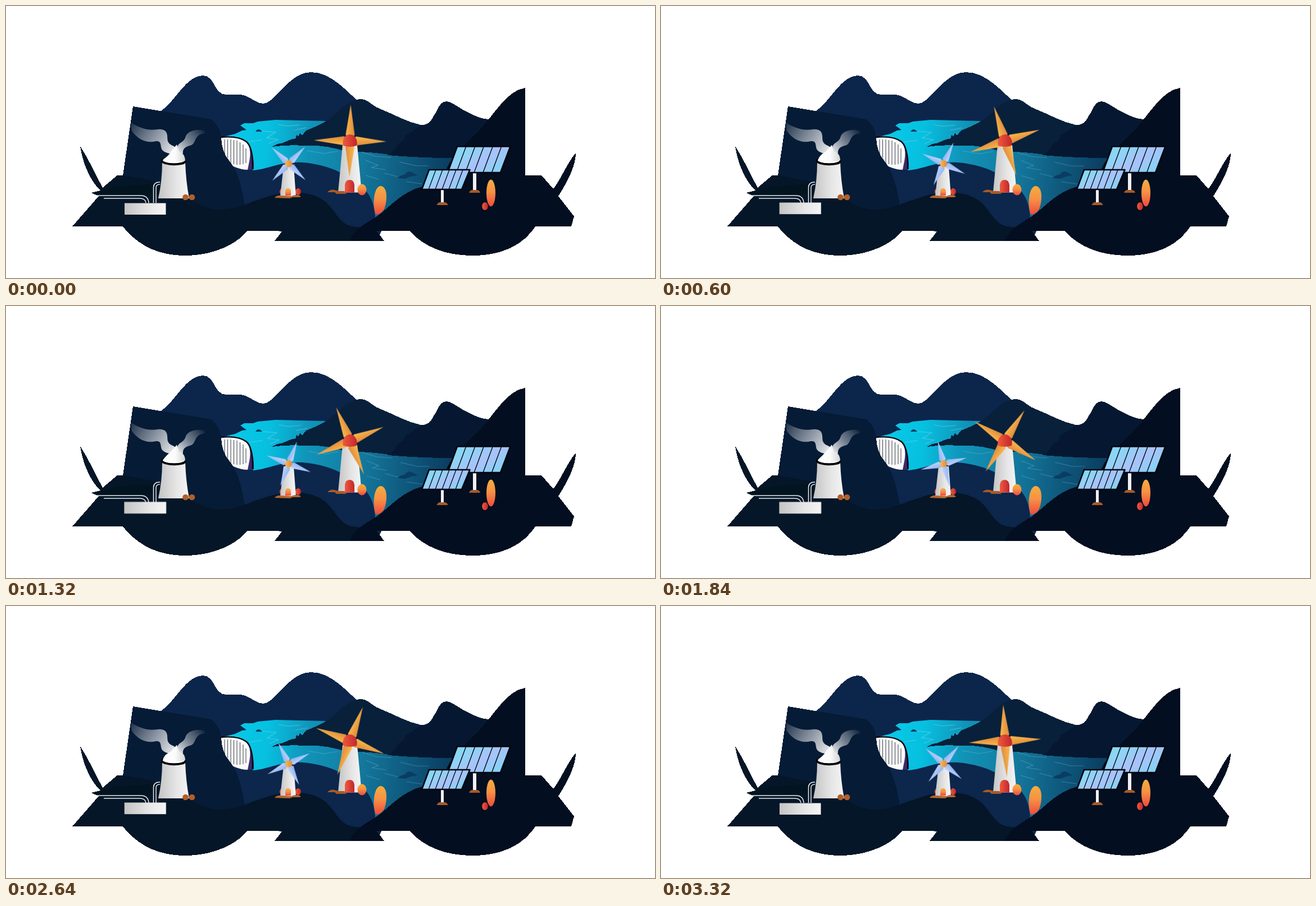
These frames come from a looping animation (1155x485 px, 3.36 s). An HTML page without scripts:

```html
<!DOCTYPE html>
<html lang="en">
<head>
<meta charset="utf-8">
<title>Renewable valley</title>
<style>
  html, body { margin: 0; width: 100%; height: 100%; overflow: hidden; background: #fff; }
  svg { display: block; width: 100vw; height: 100vh; }
  .crisp { shape-rendering: crispEdges; }

  /* Every part eases between two poses, turning at the same moment. */
  .sails { animation: spin 3.36s linear infinite; }
  @keyframes spin {
    0% { transform: rotate(0deg); }
    45.2% { transform: rotate(180deg); }
    100% { transform: rotate(360deg); }
  }
  .tank { transform-origin: 248px 361px; animation: lift 3.36s linear infinite; }
  @keyframes lift {
    0%, 100% { transform: none; }
    45.2% { transform: translateY(-2.4px) scale(1.02); }
  }
  .glints { animation: drift 3.36s linear infinite; }
  @keyframes drift {
    0%, 100% { transform: none; }
    45.2% { transform: translate(2px, 1px); }
  }
</style>
</head>
<body>
<svg viewBox="0 0 1155 485" xmlns="http://www.w3.org/2000/svg">
  <defs>
    <linearGradient id="water" gradientUnits="userSpaceOnUse" x1="400" y1="250" x2="790" y2="300">
      <stop offset="0" stop-color="#08c9e8"/>
      <stop offset=".16" stop-color="#07c0e0"/>
      <stop offset=".35" stop-color="#1193b8"/>
      <stop offset=".6" stop-color="#14789d"/>
      <stop offset="1" stop-color="#0a3c60"/>
    </linearGradient>
    <linearGradient id="stone">
      <stop offset="0" stop-color="#c4c4c4"/>
      <stop offset=".6" stop-color="#e6e6e6"/>
      <stop offset="1" stop-color="#f5f5f5"/>
    </linearGradient>
    <linearGradient id="ember" x2="0" y2="1">
      <stop offset="0" stop-color="#f5ad3f"/>
      <stop offset=".45" stop-color="#f69245"/>
      <stop offset="1" stop-color="#ef4a3c"/>
    </linearGradient>
    <linearGradient id="red">
      <stop offset="0" stop-color="#ef5a3c"/>
      <stop offset="1" stop-color="#c1272d"/>
    </linearGradient>
    <linearGradient id="gold">
      <stop offset="0" stop-color="#fbb84c"/>
      <stop offset="1" stop-color="#dd8a3c"/>
    </linearGradient>
    <linearGradient id="ice">
      <stop offset="0" stop-color="#8db4f0"/>
      <stop offset="1" stop-color="#c3d3fd"/>
    </linearGradient>
    <linearGradient id="glass" x2="1" y2=".6">
      <stop offset="0" stop-color="#7fdcf3"/>
      <stop offset=".35" stop-color="#8fd3f6"/>
      <stop offset=".65" stop-color="#a9c2fb"/>
      <stop offset="1" stop-color="#86d2f5"/>
    </linearGradient>
    <linearGradient id="smokeL" gradientUnits="userSpaceOnUse" x1="222" y1="212" x2="302" y2="262">
      <stop offset="0" stop-color="#fff" stop-opacity=".12"/>
      <stop offset=".5" stop-color="#e4e6ea" stop-opacity=".6"/>
      <stop offset="1" stop-color="#fff" stop-opacity=".95"/>
    </linearGradient>
    <linearGradient id="smokeR" gradientUnits="userSpaceOnUse" x1="354" y1="222" x2="308" y2="262">
      <stop offset="0" stop-color="#fff" stop-opacity=".03"/>
      <stop offset=".5" stop-color="#d5d8de" stop-opacity=".5"/>
      <stop offset="1" stop-color="#fff" stop-opacity=".9"/>
    </linearGradient>
    <linearGradient id="puffFill">
      <stop offset="0" stop-color="#fff"/>
      <stop offset=".55" stop-color="#fbfbfb"/>
      <stop offset="1" stop-color="#d4d4d4"/>
    </linearGradient>
    <path id="bigBlade" d="M0-64.500L8-11 0 0-8-11Z" fill="url(#gold)"/>
    <path id="smallBlade" d="M0-42L5.800-8 0 0-5.800-8Z" fill="url(#ice)"/>
    <path id="mound" d="M-10 5Q-8 0-4 0H5Q9 1 10 5Z" fill="#a65a28"/>
  </defs>

  <g transform="translate(0 1)">
    <!-- far mountains -->
    <path class="crisp" fill="#0c254b" d="M262 192Q275 188 281 182C302 166 322 123 350 123C373 123 369 157 392 157
      C408 157 416 155 428 160C440 165 447 173 458 173C480 172 503 117 543 117C578 117 605 150 626 168
      L700 300V395H380Z"/>

    <!-- river -->
    <path fill="url(#water)" d="M380 234L408 227 420 221 428 220 417 212 424 208 440 208 448 205 480 202 568 204
      L640 240 700 262 800 266V330L740 350 670 378H650L600 320 440 292Z"/>
    <path fill="#0b3c64" d="M444 223Q449 215 456 223ZM697 306Q702 300 709 300Q716 291 724 296L733 301 721 303 711 307Z"/>
    <g class="glints" fill="none" stroke="#8fdcf0" stroke-width="1.1" stroke-opacity=".5">
      <path d="M484 210L501 213 523 211M455 222L480 224 464 234 484 237 468 244M432 241L455 238M514 220L535 216"/>
      <path d="M536 257L566 262 590 258M634 260L658 267 686 269M640 274L662 283 650 287 676 291M673 297L696 303M700 277L730 284 752 284M640 301L664 308M712 312L740 316" stroke-opacity=".32"/>
    </g>

    <!-- middle ranges -->
    <path class="crisp" fill="#08203a" d="M473 250L483 245 493 243 507 237 516 235 517 228 520 232 523 226 527 230 534 221
      Q552 214 565 207C590 194 603 166 632 165C646 166 651 177 665 182C690 192 716 207 738 211L760 264
      L682 264Q640 258 606 259 570 246 530 248 500 246 473 250Z"/>
    <path class="crisp" fill="#061831" d="M679 265Q693 258 696 246L708 238 711 229 724 222 738 211
      C756 212 757 200 765 189C771 174 777 169 784 169C795 170 810 184 825 190C840 198 850 201 862 201
      L870 270H790Q740 270 679 265Z"/>

    <!-- mill hill -->
    <path fill="#0c264c" d="M400 288L440 292C468 290 486 276 528 278C575 282 606 299 630 318
      C651 336 655 353 657 376L684 366 660 418H560L400 380Z"/>

    <!-- dam -->
    <path fill="#3c2c6c" d="M425 242Q442 254 441 290L430 291Z"/>
    <path fill="#fbfbfb" d="M380 233Q420 231 430 245 437 255 433 276L430 291Q408 291 380 270Z"/>
    <path fill="none" stroke="#3b3f4a" stroke-width="1" d="M389 237V262M394.500 237V270M400 237V279M405.500 238V281M411 239V282M416.500 242V282M422 246V281M427 253V279"/>
    <path fill="none" stroke="#02060f" stroke-width="2.400" d="M382 233Q414 230 428 241 440 252 439 290"/>

    <!-- left cliff -->
    <path class="crisp" fill="#051b36" d="M226 178L365 201C377 210 382 222 383 234C384 252 388 264 398 276
      C412 292 421 325 426 362L300 375 206 330 208 301Z"/>

    <!-- left foreground -->
    <path class="crisp" fill="#041627" d="M132 249C147 271 158 298 172 323L198 301H208L270 312 300 340 327 342
      C346 356 361 362 380 362C412 362 428 350 460 341C496 327 545 327 570 349C590 368 594 393 625 393
      L660 400 673 418H478L492 400H430C407 427 365 444 318 444C273 444 235 427 208 392H118L165 338 152 332 168 328
      C151 312 137 282 132 249Z"/>
    <path fill="#031421" d="M152 332L200 321 268 316V334L165 338Z"/>

    <!-- right cliff and foreground -->
    <path class="crisp" fill="#030e20" d="M924 145V301H953L974 325C987 309 999 278 1014 261C1014 282 1002 308 983 338
      L1011 374 1006 392H942C920 427 880 444 830 444C785 444 745 430 718 400H658L673 418H612
      C622 390 650 384 668 368C696 344 716 324 752 319C785 312 778 290 795 271
      C812 246 838 229 856 205C878 177 897 149 924 145Z"/>

    <!-- cooling tower -->
    <path fill="url(#stone)" d="M278 277H319Q320 311 326 342H271Q278 311 278 277Z"/>
    <g fill="#b05f2a"><circle cx="319.500" cy="340" r="5.300"/><circle cx="331" cy="340" r="5.300"/></g>
    <path fill="url(#smokeL)" d="M222 207C236 215 250 222 270 219C291 217 286 233 288 240C291 249 300 246 303 254
      L301 262H291C282 260 277 257 276 251C275 242 274 240 267 240C250 244 236 238 224 222Z"/>
    <path fill="url(#smokeR)" d="M354 221C337 217 323 223 320 231C317 243 308 241 305 250L307 261 315 262
      C314 251 323 249 330 247C339 243 334 228 354 226Z"/>
    <ellipse cx="298" cy="275" rx="21" ry="6" fill="#fff" stroke="#05060a" stroke-width="3"/>
    <path fill="url(#puffFill)">
      <animate attributeName="d" dur="1.68s" repeatCount="indefinite" values="
        M279 273Q290 266 294 258L304 246 308 259Q318 261 319 275Q300 281 279 273Z;
        M279 274Q280 263 293 259L304 247 308 259Q319 261 319 274Q300 280 279 274Z;
        M279 273Q290 266 294 258L304 246 308 259Q318 261 319 275Q300 281 279 273Z"/>
    </path>
    <path fill="none" stroke="#05060a" stroke-width="3.600" d="M277 274C278 283 317 284 319 276"/>

    <!-- pipes and tank -->
    <g fill="none" stroke="#e9ebee" stroke-width="1.500">
      <path d="M162 337H240Q253 337 254 350M174 342H238Q248 342 249 350"/>
      <path d="M262.500 350V322Q263 313 274 313M267 350V323Q267 317 274 317"/>
    </g>
    <rect class="tank" x="211" y="350.500" width="73.500" height="20.500" fill="url(#stone)"/>

    <!-- small mill -->
    <ellipse cx="492" cy="330" rx="5" ry="6" fill="url(#red)"/>
    <ellipse cx="520" cy="330" rx="5" ry="6" fill="url(#red)"/>
    <path fill="url(#stone)" d="M494 285H512L516 338H488Z"/>
    <path fill="url(#ember)" d="M497 337V329Q498 324 502 324 507 324 507 330V337Z"/>
    <path fill="#b4652e" d="M478 341Q482 336 490 337L508 338Q520 333 525 339L522 340 510 340 505 342Z"/>
    <g transform="translate(503 280.300) rotate(44)">
      <g class="sails">
        <use href="#smallBlade"/><use href="#smallBlade" transform="rotate(90)"/>
        <use href="#smallBlade" transform="rotate(180)"/><use href="#smallBlade" transform="rotate(270)"/>
      </g>
    </g>
    <circle cx="503" cy="280.300" r="6.300" fill="url(#gold)"/>

    <!-- big mill -->
    <path fill="url(#stone)" d="M599 247H625L633 331.500H591Z"/>
    <path fill="url(#red)" d="M603 331.500V318Q604 309 611.500 309 619 309 620 318V331.500Z"/>
    <ellipse cx="633.500" cy="326.500" rx="8" ry="10" fill="url(#ember)"/>
    <path fill="#a65a28" d="M572 331Q577 325 585 327L592 329 602 329 606 334H588L585 331Z"/>
    <g transform="translate(612.300 239.500) rotate(.9)">
      <g class="sails">
        <use href="#bigBlade"/><use href="#bigBlade" transform="rotate(90)"/>
        <use href="#bigBlade" transform="rotate(180)"/><use href="#bigBlade" transform="rotate(270)"/>
      </g>
    </g>
    <path fill="url(#red)" d="M600 248C597 236 605 228 612 228C620 228 627 237 624 248Q612 252 600 248Z"/>
    <path fill="url(#ember)" d="M658 371C651 352 655 320 667 320C680 321 679 349 672 363Q664 372 658 371Z"/>

    <!-- solar panels -->
    <rect x="831" y="297" width="6" height="31" fill="#f1f1f1"/>
    <use href="#mound" x="834" y="327"/>
    <g stroke="#03060f" stroke-linejoin="round">
      <path fill="url(#glass)" stroke-width="2.600" d="M803 249.500H897.500L880 296H786Z"/>
      <path fill="none" stroke-width="1.400" d="M818.500 250L801.500 296M834.500 250L817.500 296M850 250L833 296M866 250L849 296M881.500 250L864.500 296"/>
    </g>
    <rect x="774" y="326" width="5" height="24" fill="#f1f1f1"/>
    <use href="#mound" x="776.500" y="349"/>
    <g stroke="#03060f" stroke-linejoin="round">
      <path fill="url(#glass)" stroke-width="2.600" d="M753 291H825.500L811 326H740Z"/>
      <path fill="none" stroke-width="1.300" d="M765 291L752 326M777 291L764 326M789 291L776 326M801 291L788 326M813 291L800 326"/>
    </g>
    <ellipse cx="863" cy="332.500" rx="8" ry="24" fill="url(#ember)"/>
    <ellipse cx="852.500" cy="356" rx="5.300" ry="7" fill="url(#red)"/>
  </g>
</svg>
</body>
</html>
```
